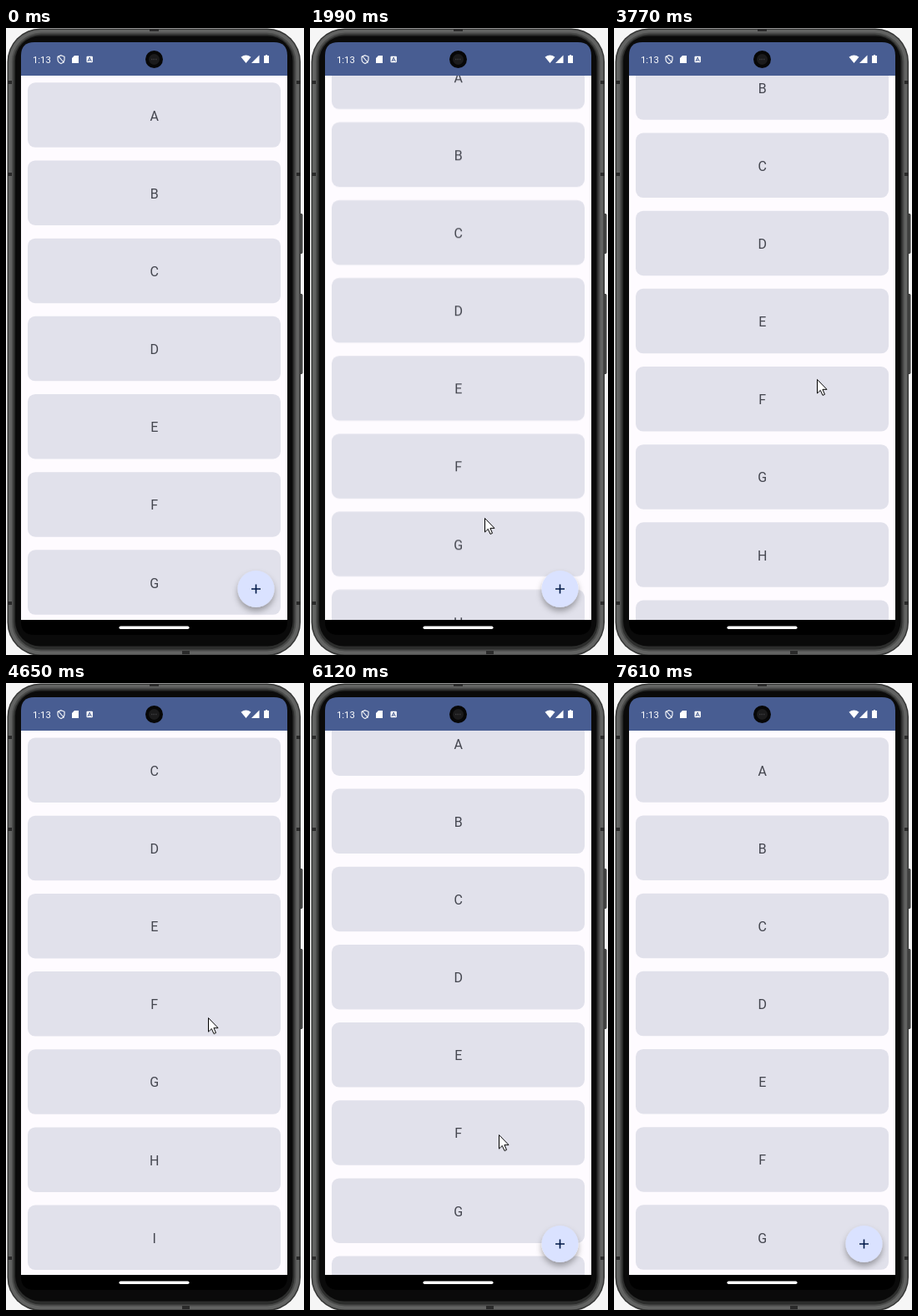
Animation, 357 px wide and 750 px high, one loop 9080 ms. Source, as an HTML page:

```html
<!DOCTYPE html>
<html lang="en">
<head>
<meta charset="utf-8">
<title>Scrolling list</title>
<style>
html, body { margin: 0; width: 100%; height: 100%; overflow: hidden; background: #f6f6f6; }
svg { display: block; width: 100%; height: 100%; }
text { font-family: Roboto, sans-serif; }
#list, #fab, #cursor { animation: 9080ms linear infinite; }
#list { animation-name: scroll; }
#fab { animation-name: toggle; animation-timing-function: step-end; }
#cursor { animation-name: point; }
#list text { font-size: 16px; fill: #44464f; text-anchor: middle; }

@keyframes scroll {
  0%, 17.3% { transform: translateY(0); }
  21.92% { transform: translateY(-45.7px); }
  25.44% { transform: translateY(-87px); }
  31.39%, 40.2% { transform: translateY(-116px); }
  41.52% { transform: translateY(-126px); }
  44.6% { transform: translateY(-162px); }
  47.58%, 51.21% { transform: translateY(-186.2px); }
  57.49% { transform: translateY(-107px); }
  58.81% { transform: translateY(-101px); }
  67.4% { transform: translateY(-32px); }
  69.38% { transform: translateY(-16px); }
  72.14%, 100% { transform: translateY(0); }
}
@keyframes toggle {
  0% { visibility: visible; }
  25.88% { visibility: hidden; }
  60.57%, 100% { visibility: visible; }
}
@keyframes point {
  0%, 7.45% { transform: translate(360px, 659px); }
  7.49% { transform: translate(346px, 659px); animation-timing-function: ease-out; }
  12.22%, 16.08% { transform: translate(204px, 650px); }
  21.92% { transform: translate(209px, 586px); }
  25.44% { transform: translate(209px, 545px); }
  31.39%, 34.91% { transform: translate(209px, 517px); animation-timing-function: ease-in-out; }
  38.22%, 40.2% { transform: translate(239px, 441px); }
  41.52% { transform: translate(243px, 420px); }
  47.58%, 49.23% { transform: translate(243px, 381px); }
  51.21% { transform: translate(242px, 400px); }
  57.49% { transform: translate(230px, 464px); }
  58.81% { transform: translate(230px, 470px); }
  67.4% { transform: translate(226px, 540px); }
  69.38% { transform: translate(226px, 556px); }
  75.66%, 78.41% { transform: translate(226px, 592px); animation-timing-function: ease-in; }
  83.81%, 100% { transform: translate(232px, 752px); }
}
</style>
</head>
<body>
<svg viewBox="0 0 357 750">
  <defs>
    <clipPath id="view"><rect x="18" y="57" width="319" height="651"/></clipPath>
    <filter id="shadow" x="-50%" y="-50%" width="200%" height="200%">
      <feDropShadow dx="0" dy="4.5" stdDeviation="3.5" flood-color="#000" flood-opacity=".32"/>
    </filter>
  </defs>

  <!-- phone body -->
  <g fill="#4c4d4c" stroke="#222" stroke-width=".8">
    <rect x="350" y="222.5" width="5" height="47" rx="1"/>
    <rect x="350" y="318.5" width="5" height="95" rx="1"/>
  </g>
  <rect x="1.5" y=".5" width="351.5" height="750.5" rx="40" fill="#343534"/>
  <rect x="3" y="2" width="348.5" height="747.5" rx="38.5" fill="#626362"/>
  <rect x="7" y="5.5" width="340.5" height="740" rx="35" fill="#4a4b4a"/>
  <rect x="9" y="7.5" width="336.5" height="736" rx="33" fill="#2c2d2c"/>
  <rect x="11" y="9.5" width="332.5" height="730" rx="30"  fill="#0a0a0a"/>
  <path d="M2 63h5v4H2zM2 173h5v4H2zM2 686h5v4H2zM348 63h5v4h-5zM348 173h5v4h-5zM348 686h5v4h-5zM172 1h11v3h-11zM211 745h9v4h-9z" fill="#2a2a2a"/>

  <!-- screen -->
  <path d="M18 57V33Q18 17 34 17H321Q337 17 337 33V57Z" fill="#485d92"/>
  <path d="M18 708H337V710Q337 726 321 726H34Q18 726 18 710Z"/>
  <rect x="18" y="57" width="319" height="651" fill="#fefbff"/>
  <g clip-path="url(#view)">
    <g id="list"></g>
    <g id="fab">
      <circle cx="299.5" cy="671" r="22" fill="#dae2ff" filter="url(#shadow)"/>
      <path d="M294 671h11M299.5 665.5v11" stroke="#001847" stroke-width="1.6"/>
    </g>
  </g>
  <rect x="135.5" y="715.5" width="84" height="3.5" rx="1.75" fill="#fff"/>

  <!-- status bar -->
  <g fill="#fff">
    <text x="32" y="41.6" font-size="11.3">1:13</text>
    <path d="M66 32.7l4 1.6v3.2q0 3.5-4 5.1-4-1.6-4-5.1v-3.2zM62.5 33.5l7 8" fill="none" stroke="#fff" stroke-width="1.1"/>
    <path d="M82 33h5v9h-8v-6z"/>
    <rect x="96.5" y="33.8" width="7.4" height="7.4" rx="1"/>
    <path d="M98 40l2.2-5 2.2 5M99 38.4h2.4" fill="none" stroke="#485d92"/>
    <path d="M287.5 42L281.5 34.7Q287.5 30.2 293.5 34.7Z"/>
    <path d="M294 42h9.5v-9.5z"/>
    <path d="M311 32h2v1h2v9h-6v-9h2z"/>
  </g>
  <circle cx="177.5" cy="37.5" r="10.5" fill="#070707"/>
  <circle cx="177.5" cy="37.5" r="6.5" fill="#1b1b1c"/>
  <path d="M174 37.5h7" stroke="#3a3a3c" stroke-width="1.5" stroke-dasharray="1.5 1"/>

  <g id="cursor">
    <path d="M.5.5V17l3.8-3.6 2.7 6 2.5-1.1-2.6-5.9H12Z" fill="#fff" stroke="#000"/>
  </g>
</svg>
<script>
const pitch = 93.17;
document.getElementById("list").innerHTML = [..."ABCDEFGHI"].map((letter, i) => {
  const y = 65.3 + i * pitch;
  return `<rect x="26" y="${y}" width="303" height="77.5" rx="9" fill="#e1e1eb"/>
    <text x="177.7" y="${y + 45.2}">${letter}</text>`;
}).join("");
</script>
</body>
</html>
```
